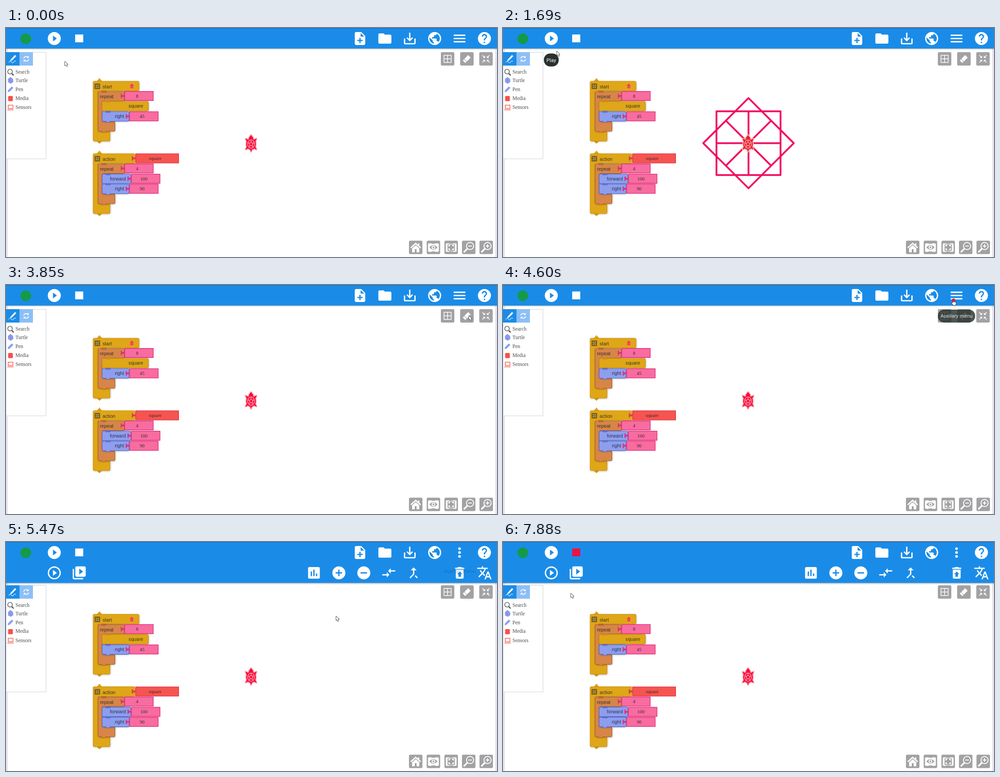
These frames come from a looping animation (1093x512 px, 8000 ms). An HTML page with a canvas:

```html
<!DOCTYPE html>
<html lang="en">
<head>
<meta charset="utf-8">
<title>Block programming</title>
<style>
  html, body { margin: 0; width: 100%; height: 100%; overflow: hidden; background: #fff; }
  canvas { display: block; }
</style>
</head>
<body>
<canvas id="stage" width="1093" height="512"></canvas>
<script>
const ctx = document.getElementById('stage').getContext('2d');
const W = 1093, H = 512, LOOP = 8000;
const BLUE = '#1a8ce8', GOLD = '#dfa618', ORANGE = '#d78548', PERI = '#8d9eef';
const SANS = '10.7px "Liberation Sans", Arial, sans-serif';
const SERIF = '10.7px "Liberation Serif", Times, serif';
const MENU_AT = 4700, RUN = [1000, 1400], CLEAR_AT = 3600;

// Toolbar glyphs on a 24 unit grid
const DISC = 'M12 2a10 10 0 1 0 0 20a10 10 0 1 0 0-20z';
const GLYPHS = {
  play: DISC + 'M10 16.5v-9l6 4.5z',
  slow: DISC + 'M12 4a8 8 0 1 0 0 16a8 8 0 1 0 0-16zM10 16.5v-9l6 4.5z',
  steps: 'M4 6H2v14c0 1.1.9 2 2 2h14v-2H4zM20 2H8c-1.1 0-2 .9-2 2v12c0 1.1.9 2 2 2h12c1.1 0 2-.9 2-2V4c0-1.1-.9-2-2-2zM12 14.5v-9l6 4.5z',
  create: 'M14 2H6c-1.1 0-2 .9-2 2v16c0 1.1.9 2 2 2h12c1.1 0 2-.9 2-2V8zM16 16h-3v3h-2v-3H8v-2h3v-3h2v3h3zM13 9V3.5L18.5 9z',
  folder: 'M10 4H4c-1.1 0-2 .9-2 2v12c0 1.1.9 2 2 2h16c1.1 0 2-.9 2-2V8c0-1.1-.9-2-2-2h-8z',
  save: 'M19 12v7H5v-7H3v7c0 1.1.9 2 2 2h14c1.1 0 2-.9 2-2v-7zM13 12.67l2.59-2.58L17 11.5l-5 5-5-5 1.41-1.41L11 12.67V3h2z',
  globe: DISC + 'M11 19.93c-3.95-.49-7-3.85-7-7.93 0-.62.08-1.21.21-1.79L9 15v1c0 1.1.9 2 2 2zM17.9 17.39c-.26-.81-1-1.39-1.9-1.39h-1v-3c0-.55-.45-1-1-1H8v-2h2c.55 0 1-.45 1-1V7h2c1.1 0 2-.9 2-2v-.41c2.93 1.19 5 4.06 5 7.41 0 2.08-.8 3.97-2.1 5.39z',
  menu: 'M3 18h18v-2H3zM3 13h18v-2H3zM3 6v2h18V6z',
  dots: 'M12 4a2 2 0 1 0 0 4a2 2 0 1 0 0-4zM12 10a2 2 0 1 0 0 4a2 2 0 1 0 0-4zM12 16a2 2 0 1 0 0 4a2 2 0 1 0 0-4z',
  help: DISC + 'M13 19h-2v-2h2zM15.07 11.25l-.9.92C13.45 12.9 13 13.5 13 15h-2v-.5c0-1.1.45-2.1 1.17-2.83l1.24-1.26c.37-.36.59-.86.59-1.41 0-1.1-.9-2-2-2s-2 .9-2 2H8c0-2.21 1.79-4 4-4s4 1.79 4 4c0 .88-.36 1.68-.93 2.25z',
  chart: 'M19 3H5c-1.1 0-2 .9-2 2v14c0 1.1.9 2 2 2h14c1.1 0 2-.9 2-2V5c0-1.1-.9-2-2-2zM9 17H7v-7h2zM13 17h-2V7h2zM17 17h-2v-4h2z',
  plus: DISC + 'M17 13h-4v4h-2v-4H7v-2h4V7h2v4h4z',
  minus: DISC + 'M17 13H7v-2h10z',
  arrows: 'M9 14H2v2h7v3l4-4-4-4zM15 13v-3h7V8h-7V5l-4 4z',
  merge: 'M17 20.41L18.41 19 15 15.59 13.59 17zM7.5 8H11v5.59L5.59 19 7 20.41l6-6V8h3.5L12 3.5z',
  trash: 'M19 4h-3.5l-1-1h-5l-1 1H5v2h14zM6 7v12c0 1.1.9 2 2 2h8c1.1 0 2-.9 2-2V7zM14 14v4h-4v-4H8l4-4 4 4z',
  language: 'M12.87 15.07l-2.54-2.51c1.74-1.94 2.98-4.17 3.74-6.56H17V4h-7V2H8v2H1v2h11.17C11.5 7.92 10.44 9.75 9 11.35 8.07 10.32 7.3 9.19 6.69 8h-2c.73 1.63 1.73 3.17 2.98 4.56l-5.09 5.02L4 19l5-5 3.11 3.11zM18.5 10h-2L12 22h2l1.12-3h4.75L21 22h2zM15.88 17l1.62-4.33L19.12 17z'
};
for (const name in GLYPHS) GLYPHS[name] = new Path2D(GLYPHS[name]);

// time, x, y
const CURSOR = [
  [130, 131, 75], [450, 115, 45], [700, 104, 24], [1350, 106, 26], [1690, 119, 52],
  [2200, 560, 108], [2530, 955, 125], [2800, 1010, 97], [3010, 1031, 78], [3370, 1029, 72],
  [3700, 1029, 72], [4150, 1034, 62], [4450, 1006, 34], [4600, 1003, 32], [4990, 1003, 30],
  [5200, 925, 95], [5470, 736, 166], [5770, 388, 179], [6050, 250, 280], [6420, 110, 78],
  [6620, 101, 70], [7150, 101, 70], [7390, 125, 98], [7700, 153, 116], [7880, 151, 115]
];
const CLICKS = [960, 3560, 4570, 6700];

const clamp = v => Math.max(0, Math.min(1, v));
const within = (t, a, b) => t >= a && t < b;

function at(x, y, draw, scale = 1, angle = 0) {
  ctx.save();
  ctx.translate(x, y);
  ctx.rotate(angle);
  ctx.scale(scale, scale);
  draw();
  ctx.restore();
}

function rect(x, y, w, h, fill, r = 0) {
  ctx.fillStyle = fill;
  ctx.beginPath();
  ctx.roundRect(x, y, w, h, r);
  ctx.fill();
}

function oval(x, y, rx, ry, fill) {
  ctx.fillStyle = fill;
  ctx.beginPath();
  ctx.ellipse(x, y, rx, ry, 0, 0, 7);
  ctx.fill();
}

function line(d, color, width = 1.5) {
  ctx.strokeStyle = color;
  ctx.lineWidth = width;
  ctx.stroke(new Path2D(d));
}

function shape(d, fill, stroke, width = 1) {
  const p = new Path2D(d);
  if (stroke) {
    ctx.strokeStyle = stroke;
    ctx.lineWidth = width;
    ctx.stroke(p);
  }
  ctx.fillStyle = fill;
  ctx.fill(p);
}

function text(s, x, y, font, color = '#3b3528', align = 'left') {
  ctx.font = font;
  ctx.fillStyle = color;
  ctx.textAlign = align;
  ctx.fillText(s, x, y);
}

function glyph(name, x, y) {
  at(x, y, () => {
    ctx.translate(-12, -12);
    ctx.fillStyle = '#fff';
    ctx.fill(GLYPHS[name], 'evenodd');
  }, 1.45);
}

function header(t, open) {
  const h = open ? 91.5 : 46;
  ctx.save();
  ctx.shadowColor = 'rgba(0,0,0,.3)';
  ctx.shadowBlur = 3;
  ctx.shadowOffsetY = 1;
  rect(0, 0, W, h, BLUE);
  ctx.restore();
  rect(0, 0, W, 1, '#1769ad');
  oval(44, 24, 12, 12, '#159a49');

  glyph('play', 107.5, 23.5);
  const busy = within(t, 980, 1500) || t >= 6700;
  rect(154, 14.5, 18, 17.5, busy ? '#ee1144' : '#fff');
  ['create', 'folder', 'save', 'globe', open ? 'dots' : 'menu', 'help']
    .forEach((name, i) => glyph(name, 788 + i * 55.4, 23.5));
  if (!open) return;

  const hover = clamp((t - 6400) / 180) * clamp((7360 - t) / 180);
  rect(80, 46, 55, 45.5, `rgba(10,50,110,${0.42 * hover})`);
  glyph('slow', 107.5, 69);
  glyph('steps', 163, 69);
  ['chart', 'plus', 'minus', 'arrows', 'merge'].forEach((name, i) => glyph(name, 685.5 + i * 55.5, 69));
  glyph('trash', 1010, 69);
  glyph('language', 1065, 69);
}

function palette() {
  rect(0, 54, 89, 238.5, '#fff');
  ctx.strokeStyle = '#d9d6de';
  ctx.lineWidth = 1.2;
  ctx.strokeRect(0.5, 54.5, 88.5, 238);
  rect(0, 54, 30, 30, BLUE);
  rect(30, 54, 30, 30, '#8cbff6');
  shape('M10 71L20 60L23 63L13 73L9 74z', '#e8f3ff', '#0e5ba4', 0.6);
  line('M6 77Q9 72 12 76T17 76T22 75', '#dcecff', 1.2);
  line('M39.5 68A5.5 5.5 0 0 1 49 65.5M50.5 70A5.5 5.5 0 0 1 41 72.5', '#fff', 1.7);
  shape('M50.5 62V67H45.5zM39.5 76V71H44.5z', '#fff');

  oval(9, 97.5, 6, 6, '#666');
  oval(9, 97.5, 4.4, 4.4, '#f7f7f7');
  line('M13 102L17 106', '#555', 2.6);
  shape('M5 114L10 110L15 114L16 120L11 124L5 121z', PERI, '#6f83dc', 1);
  line('M10 111V123M5 115L15 121', '#6f83dc', 0.6);
  shape('M4 143L5 139L13 131L16 134L8 142z', PERI, '#7b8de5', 0.6);
  rect(5, 152, 10, 11.5, '#f7514b', 1.5);
  line('M4 155H16M4 160H16', '#f7514b', 1.2);
  line('M5 172.5H15.5V180H5zM3 183H17', '#f7604f', 1.5);
  ['Search', 'Turtle', 'Pen', 'Media', 'Sensors'].forEach((s, i) =>
    text(s, 21, [102, 121, 141, 160.5, 181][i], '11.5px "Liberation Serif", Times, serif', '#4b4b4b'));
}

function outline(points, fill, stroke) {
  ctx.save();
  ctx.beginPath();
  const [a, b] = [points[points.length - 1], points[0]];
  ctx.moveTo((a[0] + b[0]) / 2, (a[1] + b[1]) / 2);
  points.forEach((p, i) => ctx.arcTo(...p, ...points[(i + 1) % points.length], 3));
  ctx.closePath();
  ctx.fillStyle = fill;
  ctx.shadowColor = 'rgba(0,0,0,.3)';
  ctx.shadowBlur = 4;
  ctx.shadowOffsetX = ctx.shadowOffsetY = 1;
  ctx.fill();
  ctx.shadowColor = 'transparent';
  ctx.strokeStyle = stroke;
  ctx.lineWidth = 1.2;
  ctx.stroke();
  ctx.restore();
}

// A C-shaped block that holds others
function clampBlock(x, y, w, h, side, fill, stroke) {
  const foot = y + h - 22;
  outline([[x, y], [x + w, y], [x + w, y + 21.5], [x + side, y + 21.5],
    [x + side, foot], [x + 37.5, foot], [x + 37.5, y + h], [x, y + h]], fill, stroke);
}

function joint(x, top, bottom, fill, stroke) {
  shape(`M${x + 8} ${top - 1}v3h10v-3z`, '#fff0', stroke, 1);
  rect(x + 8.5, top - 1.5, 9, 3, stroke + '77');
  rect(x + 8, bottom - 1, 10, 3.5, stroke);
  rect(x + 9, bottom - 1.5, 8, 3, fill);
}

function block(x, y, w, fill, stroke) {
  outline([[x, y], [x + w, y], [x + w, y + 21.5], [x, y + 21.5]], fill, stroke);
  joint(x, y, y + 21.5, fill, stroke);
}

function value(x, y, w, s, fill = '#f86c9f', edge = '#e02f7c') {
  rect(x - 8, y + 6, 2.5, 10, edge);
  rect(x - 6, y + 9, 6, 4, edge);
  rect(x, y, w, 22, edge);
  rect(x + 1.5, y + 1.5, w - 3, 19, fill);
  text(s, x + (w === 97 ? 44 : 28.5), y + 14.5, SERIF, '#3c2730', 'center');
}

function stack(y, title, count) {
  const gold = '#d1970e', brown = '#a7622f', ink = '#5264c4';
  const top = y + 119;
  const w = title === 'start' ? 102 : 93;
  shape(`M201 ${top + 1}L208 ${top - 7}L215 ${top + 1}z`, GOLD);
  shape(`M201 ${top + 133}L208 ${top + 140}L215 ${top + 133}z`, GOLD);
  clampBlock(194, top, w, 134, 10.5, GOLD, gold);
  rect(197, top + 5, 12.5, 12.5, '#7c6122', 1);
  line(`M200 ${top + 8}l6.5 6.5M206.5 ${top + 8}l-6.5 6.5`, '#e9c66b', 1.4);
  rect(202, top + 10, 2.5, 2.5, '#7c6122');
  text(title, 215, top + 16, SANS);
  clampBlock(205, top + 23, 58.5, 89, 9.5, ORANGE, brown);
  joint(205, top + 23, top + 112, ORANGE, brown);
  text('repeat', 209, top + 38, SANS);
  value(263.5, top + 22, 65, count);
}

function blocks() {
  stack(0, 'start', '8');
  at(280, 130.5, () => turtle('#f40f43', '#f7b65d'), 0.33);
  block(214, 164, 103, GOLD, '#c98f13');
  text('square', 305.5, 178, SANS, undefined, 'right');
  stack(162, 'action', '4');
  value(288, 280.5, 97, 'square', '#f6544f', '#df3a4a');
  [[187, 60, 'right', '45'], [326.5, 64, 'forward', '100'], [349, 60, 'right', '90']].forEach(([y, w, name, n]) => {
    block(214, y, w, PERI, '#5264c4');
    text(name, 203 + w, y + 14, SANS, '#30344e', 'right');
    value(214.5 + w, y - 0.5, 65, n);
  });
}

function turtle(color, halo) {
  const limbs = 'M0-19L5-12L0-8L-5-12zM-12-11L-5-8L-9-3zM12-11L5-8L9-3zM-12 13L-9 6L-5 10zM12 13L9 6L5 10zM-2 13L0 18L2 13z';
  ctx.lineJoin = 'round';
  shape(limbs, color, halo, 4);
  oval(0, 1, 12.5, 14.5, halo);
  shape(limbs, color);
  oval(0, 1, 10.5, 12.5, color);
  ctx.strokeStyle = halo;
  ctx.lineWidth = 1.5;
  ctx.beginPath();
  ctx.ellipse(0, 1, 7.5, 9.2, 0, 0, 7);
  for (let i = 0; i < 5; i++) {
    const a = i * Math.PI * 0.4 - Math.PI / 2, b = a + Math.PI * 0.4;
    ctx.moveTo(4 * Math.cos(a), 1 + 4.5 * Math.sin(a));
    ctx.lineTo(4 * Math.cos(b), 1 + 4.5 * Math.sin(b));
    ctx.moveTo(4 * Math.cos(a), 1 + 4.5 * Math.sin(a));
    ctx.lineTo(7.5 * Math.cos(a), 1 + 9 * Math.sin(a));
  }
  ctx.stroke();
}

function drawing(t) {
  const side = 71.3;
  const n = within(t, RUN[0], CLEAR_AT) ? Math.floor(32 * clamp((t - RUN[0]) / 300)) : 0;
  let x = 546.5, y = 257.5, a = -Math.PI / 2;
  ctx.beginPath();
  ctx.moveTo(x, y);
  for (let i = 0; i < n; i++) {
    x += side * Math.cos(a);
    y += side * Math.sin(a);
    ctx.lineTo(x, y);
    a += Math.PI / 2;
    if (i % 4 === 3) a += Math.PI / 4;
  }
  ctx.strokeStyle = '#f20d62';
  ctx.lineWidth = 4;
  ctx.lineJoin = ctx.lineCap = 'round';
  ctx.stroke();
  ctx.lineCap = 'butt';
  at(x - 1, y + 1, () => turtle(n ? '#ef1c34' : '#fa0a38', n ? '#f5b3a4' : '#fba6b5'), 1, a + Math.PI / 2);
}

function button(x, y, draw) {
  at(x, y, () => {
    rect(-15, -15, 30, 30, '#a2a2a4', 3);
    draw();
  });
}

// Four arrows along the diagonals, pointing in or out
function corners(r, inward) {
  for (let i = 0; i < 4; i++) {
    at(0, 0, () => {
      line(`M3 3L${r} ${r}`, '#fff', 1.7);
      shape(inward ? 'M2 2H7L2 7z' : `M${r + 1} ${r + 1}h-5l5-5z`, '#fff');
    }, 1, i * Math.PI / 2);
  }
}

function tools(t) {
  if (within(t, 3450, 5850)) oval(1026, 70, 18, 18, 'rgba(0,0,0,.04)');
  button(983, 69, () => line('M-8-8H8V8H-8zM0-8V8M-8 0H8', '#fff', 1.5));
  button(1026, 69, () => at(0, 0, () => {
    rect(-4, -4, 12, 8, '#fff', 1);
    rect(-9, -4, 4, 8, '#fff', 1);
  }, 1, -Math.PI / 4));
  button(1068.5, 69, () => corners(8, true));
}

function lens(sign) {
  ctx.strokeStyle = '#fff';
  ctx.lineWidth = 2;
  ctx.beginPath();
  ctx.arc(3, -3, 8, 0, 7);
  ctx.stroke();
  line('M-3 3L-11 11', '#fff', 3.5);
  line(sign, '#fff', 2);
}

function viewTools() {
  button(912, 490.5, () => shape('M-12 0L0-11L5-6V-9H8V-4L12 0L10 2L0-7L-10 2zM-8 2L0-5L8 2V11H2V4H-2V11H-8z', '#fff'));
  const frame = () => {
    rect(-12, -9, 24, 19, '#fff', 2);
    rect(-4, -11, 8, 3, '#a2a2a4');
    rect(-4, 9, 8, 3, '#a2a2a4');
  };
  button(951.5, 490.5, () => {
    frame();
    shape('M-9 0Q0-10 9 0Q0 10-9 0z', '#a2a2a4');
    oval(0, 0, 4, 4, '#fff');
    oval(0, 0, 2, 2, '#a2a2a4');
  });
  button(991, 490.5, () => {
    frame();
    rect(-8, -7, 16, 15, '#a2a2a4', 1);
    corners(5, false);
  });
  button(1030, 490.5, () => lens('M-1-3H7'));
  button(1069, 490.5, () => lens('M-1-3H7M3-7V1'));
}

function tip(t, s, x, y, w, [i0, i1, o0, o1]) {
  const a = clamp((t - i0) / (i1 - i0)) * clamp((o1 - t) / (o1 - o0));
  if (!a) return;
  ctx.globalAlpha = a;
  y -= (1 - a) * 6;
  rect(x - w / 2, y - 14.5, w, 29, '#28312d', 14);
  text(s, x, y + 4, '11.3px Roboto, sans-serif', '#fff', 'center');
  ctx.globalAlpha = 1;
}

function tips(t) {
  tip(t, 'Play', 107.5, 71.5, 33, [650, 850, 1780, 2000]);
  tip(t, 'Auxilary menu', 1009.5, 70.5, 83, [4420, 4640, 5200, 5440]);
  if (within(t, 5430, 5580)) {
    text('Auxilary menu', 1010, 69, '11.3px Roboto, sans-serif', 'rgba(20,60,110,.3)', 'center');
  }
  tip(t, 'Run slowly', 107.5, 116.5, 66, [6400, 6600, 7430, 7680]);
}

function cursorAt(t) {
  let i = CURSOR.findIndex(k => k[0] > t);
  if (i < 0) i = CURSOR.length;
  if (i === 0 || i === CURSOR.length) return CURSOR[Math.max(0, i - 1)].slice(1);
  const [t0, x0, y0] = CURSOR[i - 1], [t1, x1, y1] = CURSOR[i];
  const k = (t - t0) / (t1 - t0);
  return [x0 + (x1 - x0) * k, y0 + (y1 - y0) * k];
}

function cursor(t, open) {
  const [x, y] = cursorAt(t);
  const hand = y < 46 || (open && x < 135 && y < 91);
  const pressed = CLICKS.some(c => within(t, c, c + 120));
  at(x, y, () => {
    ctx.lineJoin = 'round';
    if (hand) {
      shape('M-1 1Q0-1 1 1V6L5 7Q6 8 5 11L4 13H-1L-4 8Q-4 6-1 8z', '#fff', '#222', 1.6);
      if (pressed) oval(0, 2, 3.8, 3.8, 'rgba(226,16,44,.9)');
    } else {
      shape('M0 0V9L2 7L4 11L5.5 10L3.8 6.6H6.5z', '#fff', '#333', 1.5);
      if (pressed) oval(0, 1, 3.8, 3.8, 'rgba(226,16,44,.9)');
    }
  });
}

function render(t) {
  const open = t >= MENU_AT;
  const running = within(t, ...RUN);
  rect(0, 0, W, H, '#e9e2ec');
  rect(4, 40, 1085, H - 40, '#fff');
  ctx.save();
  ctx.translate(0, open ? 42.7 : 0);
  if (!running) {
    palette();
    blocks();
  }
  drawing(t);
  tools(t);
  ctx.restore();
  viewTools();
  header(t, open);
  tips(t);
  cursor(t, open);
}

const start = performance.now();
function tick() {
  render((performance.now() - start) % LOOP);
  requestAnimationFrame(tick);
}
tick();
</script>
</body>
</html>
```
